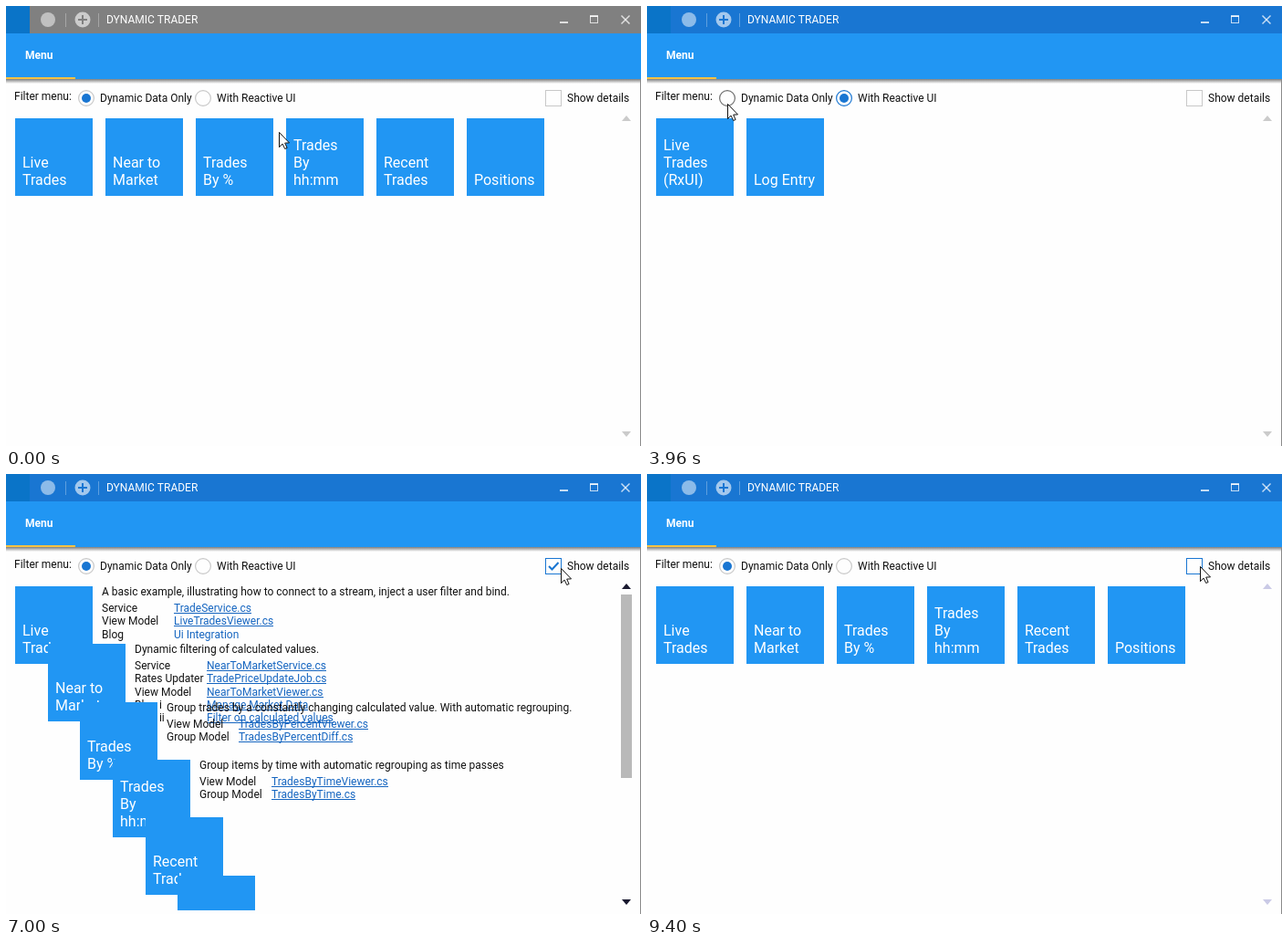
Recreate the animation shown at these times as an HTML page with a canvas. Size 696 px wide and 482 px high, loop 9640 ms.

```html
<!DOCTYPE html>
<html lang="en">
<head>
<meta charset="utf-8">
<title>Dynamic Trader</title>
<style>
html, body { margin: 0; width: 100%; height: 100%; overflow: hidden; background: #fefefe; }
canvas { display: block; }
</style>
</head>
<body>
<canvas id="stage" width="696" height="482"></canvas>
<script>
const g = document.getElementById('stage').getContext('2d');
const LOOP = 9640, STEP = 40, SLIDE = 250, PITCH = 99;
const BLUE = '#2196f3', DARK = '#1976d2', INK = '#111';
// moments of the three clicks, and of the uncheck
const TO_REACTIVE = 1240, TO_DYNAMIC = 4320, CHECK = 6840, UNCHECK = 8400;

const dynamicTiles = [
  { label: ['Live', 'Trades'],
    about: 'A basic example, illustrating how to connect to a stream, inject a user filter and bind.',
    rows: [['Service', 'TradeService.cs'], ['View Model', 'LiveTradesViewer.cs'], ['Blog', 'Ui Integration', true]] },
  { label: ['Near to', 'Market'],
    about: 'Dynamic filtering of calculated values.',
    rows: [['Service', 'NearToMarketService.cs'], ['Rates Updater', 'TradePriceUpdateJob.cs'],
      ['View Model', 'NearToMarketViewer.cs'], ['Blog i', 'Manage Market Data'], ['Blog ii', 'Filter on calculated values']] },
  { label: ['Trades', 'By %'],
    about: 'Group trades by a constantly changing calculated value. With automatic regrouping.',
    rows: [['View Model', 'TradesByPercentViewer.cs'], ['Group Model', 'TradesByPercentDiff.cs']] },
  { label: ['Trades', 'By', 'hh:mm'],
    about: 'Group items by time with automatic regrouping as time passes',
    rows: [['View Model', 'TradesByTimeViewer.cs'], ['Group Model', 'TradesByTime.cs']] },
  { label: ['Recent', 'Trades'] },
  { label: ['Positions'] }
];
const reactiveTiles = [{ label: ['Live', 'Trades', '(RxUI)'] }, { label: ['Log Entry'] }];

// pointer path: time, x, y
const path = [
  [0, 299, 138], [320, 197, 89], [520, 214, 98], [2520, 214, 98], [2560, 213, 97], [3240, 213, 97],
  [3560, 378, 122], [3920, 88, 106], [3960, 88, 107], [5320, 88, 107], [5880, 390, 79],
  [6280, 617, 93], [6360, 615, 97], [6640, 608, 103], [9320, 608, 103], [9360, 607, 102], [9400, 606, 101]
];

const clamp = v => Math.max(0, Math.min(1, v));
const mix = (a, b, p) => a + (b - a) * p;

function rect(x, y, w, h, color) {
  g.fillStyle = color;
  g.fillRect(x, y, w, h);
}

function text(s, x, y, color = INK, size = 12, weight = 400) {
  g.font = `${weight} ${size}px Roboto, sans-serif`;
  g.fillStyle = color;
  g.fillText(s, x, y);
}

function disc(x, y, r, color) {
  g.fillStyle = color;
  g.beginPath();
  g.arc(x, y, r, 0, 7);
  g.fill();
}

function line(points, color, width) {
  g.strokeStyle = color;
  g.lineWidth = width;
  g.beginPath();
  points.forEach(([x, y]) => g.lineTo(x, y));
  g.stroke();
}

function shape(points, color) {
  g.fillStyle = color;
  g.beginPath();
  points.forEach(([x, y]) => g.lineTo(x, y));
  g.closePath();
  g.fill();
}

function pointer(t) {
  const i = path.findIndex(k => k[0] > t);
  if (i < 0) return path[path.length - 1].slice(1);
  const [t0, x0, y0] = path[i - 1], [t1, x1, y1] = path[i];
  const u = (t - t0) / (t1 - t0), p = u * u * (3 - 2 * u);
  return [Math.round(mix(x0, x1, p)), Math.round(mix(y0, y1, p))];
}

function titleBar(t) {
  const p = clamp((t - 720) / 400);
  const bar = `rgb(${mix(128, 25, p)},${mix(128, 118, p)},${mix(128, 210, p)})`;
  const soft = 'rgba(255,255,255,.5)', faint = 'rgba(255,255,255,.3)';
  rect(0, 0, 696, 30, bar);
  rect(0, 0, 26, 30, '#0a74c8');
  disc(46, 15, 8, soft);
  rect(65, 8, 1, 15, faint);
  disc(84, 15, 8.5, 'rgba(255,255,255,.6)');
  rect(79, 14, 10, 2, bar);
  rect(83, 10, 2, 10, bar);
  rect(101, 8, 1, 15, faint);
  text('DYNAMIC TRADER', 110, 19, '#fff');
  const button = 'rgba(255,255,255,.75)';
  rect(607, 17, 9, 2, button);
  rect(640, 10, 9, 2, button);
  g.strokeStyle = button;
  g.lineWidth = 1;
  g.strokeRect(640.5, 11.5, 8, 7);
  line([[674.5, 10.5], [683.5, 19.5]], button, 1.5);
  line([[683.5, 10.5], [674.5, 19.5]], button, 1.5);
}

function header() {
  rect(0, 30, 696, 50, BLUE);
  text('Menu', 21, 58, '#fff', 12, 700);
  rect(0, 78, 76, 2, '#f5c242');
  const shade = g.createLinearGradient(0, 80, 0, 85);
  shade.addColorStop(0, 'rgba(0,0,0,.5)');
  shade.addColorStop(1, 'rgba(0,0,0,0)');
  rect(0, 80, 696, 5, shade);
  rect(695, 80, 1, 402, '#8a8a8a');
}

const edge = (focus, hover) => focus ? DARK : hover ? '#707070' : '#c8c8c8';

function radio(x, on, focus, hover) {
  g.strokeStyle = edge(focus, hover);
  g.lineWidth = 1.2;
  g.beginPath();
  g.arc(x, 101, 8.4, 0, 7);
  g.stroke();
  if (on) disc(x, 101, 5, DARK);
}

function filters(t, [px, py]) {
  const reactive = t >= TO_REACTIVE && t < TO_DYNAMIC;
  const over = (x0, x1) => px >= x0 && px < x1 && py >= 91 && py < 111;
  text('Filter menu:', 9, 103);
  radio(88, !reactive, t >= TO_DYNAMIC && t < CHECK, over(79, 204));
  text('Dynamic Data Only', 103, 105);
  radio(216, reactive, reactive, over(207, 319));
  text('With Reactive UI', 231, 105);
  g.strokeStyle = edge(t >= CHECK, over(591, 684));
  g.lineWidth = 1;
  g.strokeRect(591.5, 92.5, 17, 17);
  if (t >= CHECK && t < UNCHECK) line([[595, 101], [598.5, 104.5], [605.5, 97]], DARK, 2);
  text('Show details', 615, 105);
}

function details({ about, rows = [] }, x, y) {
  if (about) text(about, x, y + 10);
  rows.forEach(([kind, link, plain], i) => {
    const base = Math.round(y + 28 + i * 14.3);
    text(kind, x, base);
    text(link, x + 79, base, '#1565c0');
    if (!plain) rect(x + 79, base + 1, Math.round(g.measureText(link).width), 1, '#1565c0');
  });
}

function tile(item, x, y, open) {
  x = Math.round(x);
  y = Math.round(y);
  rect(x, y, 85, 85, BLUE);
  item.label.forEach((s, i) => text(s, x + 8, y + 73 - 19 * (item.label.length - 1 - i), '#fff', 16));
  if (open) details(item, x + 95, y);
}

function list(t) {
  const start = [UNCHECK, CHECK, TO_DYNAMIC, TO_REACTIVE].find(s => t >= s);
  const p = start ? clamp((t - start) / SLIDE) : 1;
  const open = start === CHECK;
  const across = open ? 1 - p : p;
  const down = open ? p : start === UNCHECK ? 1 - p : 0;
  const items = start === TO_REACTIVE ? reactiveTiles : dynamicTiles;
  g.save();
  g.beginPath();
  g.rect(0, 115, 672, 363);
  g.clip();
  items.forEach((item, i) => tile(item, 10 + PITCH * i * across, 123 + PITCH * i * down, open));
  g.restore();

  const arrow = open ? '#1a1a30' : t >= UNCHECK ? '#cacae6' : '#cbcbcb';
  shape([[675, 126], [680, 120], [685, 126]], arrow);
  shape([[675, 466], [685, 466], [680, 472]], arrow);
  if (open) rect(674, 132, 12, 201, '#b9b9b9');
}

function arrowCursor([x, y]) {
  g.save();
  g.translate(x + .5, y + .5);
  const outline = [[0, 0], [0, 16], [3.6, 12.6], [6.2, 18], [8.6, 17], [6.2, 11.6], [11, 11.4]];
  shape(outline, '#fff');
  line([...outline, outline[0], outline[1]], '#111', 1);
  g.restore();
}

function draw(now) {
  const t = Math.floor(now % LOOP / STEP) * STEP;
  const at = pointer(t);
  rect(0, 0, 696, 482, '#fefefe');
  titleBar(t);
  header();
  filters(t, at);
  list(t);
  arrowCursor(at);
}

const begin = performance.now();
function frame() {
  draw(performance.now() - begin);
  requestAnimationFrame(frame);
}
frame();
</script>
</body>
</html>
```
